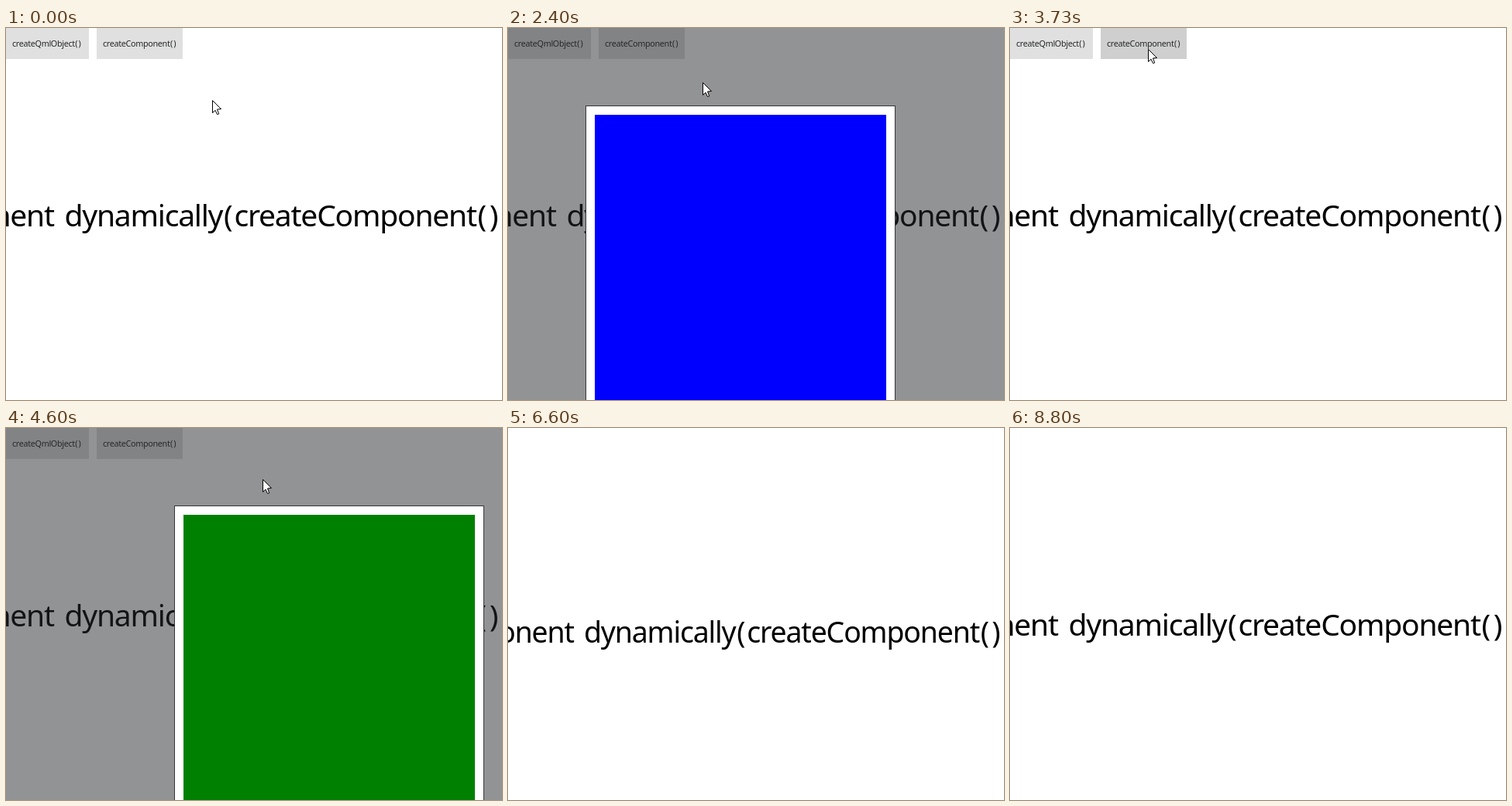
Animation, 640 px wide and 480 px high, one loop 9.19 s. Source, as an HTML page with a canvas:

```html
<!DOCTYPE html>
<html lang="en">
<head>
<meta charset="utf-8">
<title>Dynamic popups</title>
<style>
  html, body { margin: 0; width: 100%; height: 100%; overflow: hidden; background: #fff; }
  canvas { display: block; width: 640px; height: 480px; }
</style>
</head>
<body>
<canvas id="stage" width="640" height="480"></canvas>
<script>
const ctx = document.getElementById("stage").getContext("2d");
const LOOP = 9190;
const TICK = 1000 / 15;
const FONT = '"Noto Sans", "Open Sans", sans-serif';

// Pointer track: tick, x, y
const track = [
  [1, 266, 93], [13, 46, 30], [16, 46, 30], [17, 46, 28],
  [28, 46, 28], [36, 251, 70], [41, 251, 70], [44, 186, 36],
  [45, 186, 36], [49, 178, 27], [63, 178, 27], [69, 331, 66],
  [70, 336, 66], [72, 336, 66], [76, 510, 12], [78, 510, 12], [80, 518, 6]
];

const within = (n, from, to) => n >= from && n < to;
const smooth = u => u * u * (3 - 2 * u);
const mix = (a, b, u) => a + (b - a) * u;

function pointerAt(n) {
  if (n <= track[0][0]) return track[0].slice(1);
  for (let i = 1; i < track.length; i++) {
    const [t0, x0, y0] = track[i - 1];
    const [t1, x1, y1] = track[i];
    if (n <= t1) {
      const u = smooth((n - t0) / (t1 - t0));
      return [Math.round(mix(x0, x1, u)), Math.round(mix(y0, y1, u))];
    }
  }
  return track[track.length - 1].slice(1);
}

function rect(x, y, w, h, color) {
  ctx.fillStyle = color;
  ctx.fillRect(x, y, w, h);
}

// Tight words, airy brackets and spaces. Returns the x where the text ends.
function text(str, x, y, size, color) {
  ctx.font = size + "px " + FONT;
  ctx.fillStyle = color;
  for (const run of str.match(/[() ]|\w+/g)) {
    const word = /\w/.test(run);
    const pad = word ? 0 : size * 0.09;
    ctx.letterSpacing = (word ? -0.031 * size : 0) + "px";
    ctx.fillText(run, x + pad / 2, y);
    x += ctx.measureText(run).width + pad;
  }
  return x;
}

// The headline runs off both sides; x is where "dynamically" begins.
function headline(x, y, scale) {
  const lead = "Create component ";
  ctx.save();
  ctx.translate(x, y);
  ctx.scale(scale, scale);
  const width = text(lead, 0, 0, 39, "transparent");
  text(lead + "dynamically(createComponent())", -width, 0, 39, "#000");
  ctx.restore();
}

function button(x, w, label, down) {
  rect(x, 0, w, 40, down ? "#cfcfcf" : "#e0e0e0");
  text(label, x + 8, 24, 10.8, "#26282a");
}

function popup(x, color) {
  rect(0, 0, 640, 480, "rgba(38, 40, 42, 0.5)");
  rect(x, 100, 400, 400, "#353637");
  rect(x + 1, 101, 398, 398, "#fff");
  rect(x + 12, 112, 376, 376, color);
}

function pointer(x, y) {
  ctx.save();
  ctx.translate(x + 0.5, y + 0.5);
  ctx.beginPath();
  ctx.moveTo(0, 0);
  ctx.lineTo(0, 16);
  ctx.lineTo(3.5, 12.7);
  ctx.lineTo(6, 18);
  ctx.lineTo(8.2, 17.4);
  ctx.lineTo(6, 11.5);
  ctx.lineTo(11, 11);
  ctx.closePath();
  ctx.fillStyle = "#fff";
  ctx.fill();
  ctx.lineWidth = 1;
  ctx.strokeStyle = "#000";
  ctx.stroke();
  ctx.restore();
}

function draw(ms) {
  const n = Math.floor((ms + 4) / TICK);
  rect(0, 0, 640, 480, "#fff");

  if (n >= 99) {
    const rest = 1 - Math.min(1, (n - 99) / 3);
    const u = 1 - rest * rest;
    headline(mix(98, 75.5, u), mix(276.5, 268, u), mix(0.96, 1, u));
    return;
  }

  headline(75.5, 256, 1);
  button(0, 107, "createQmlObject()", within(n, 21, 23));
  button(117, 111, "createComponent()", within(n, 56, 58));
  if (within(n, 23, 38)) popup(100, "#0000ff");
  if (within(n, 58, 72)) popup(217, "#008000");
  pointer(...pointerAt(n));
}

const start = performance.now();
function loop() {
  draw((performance.now() - start) % LOOP);
  requestAnimationFrame(loop);
}
loop();
</script>
</body>
</html>
```
